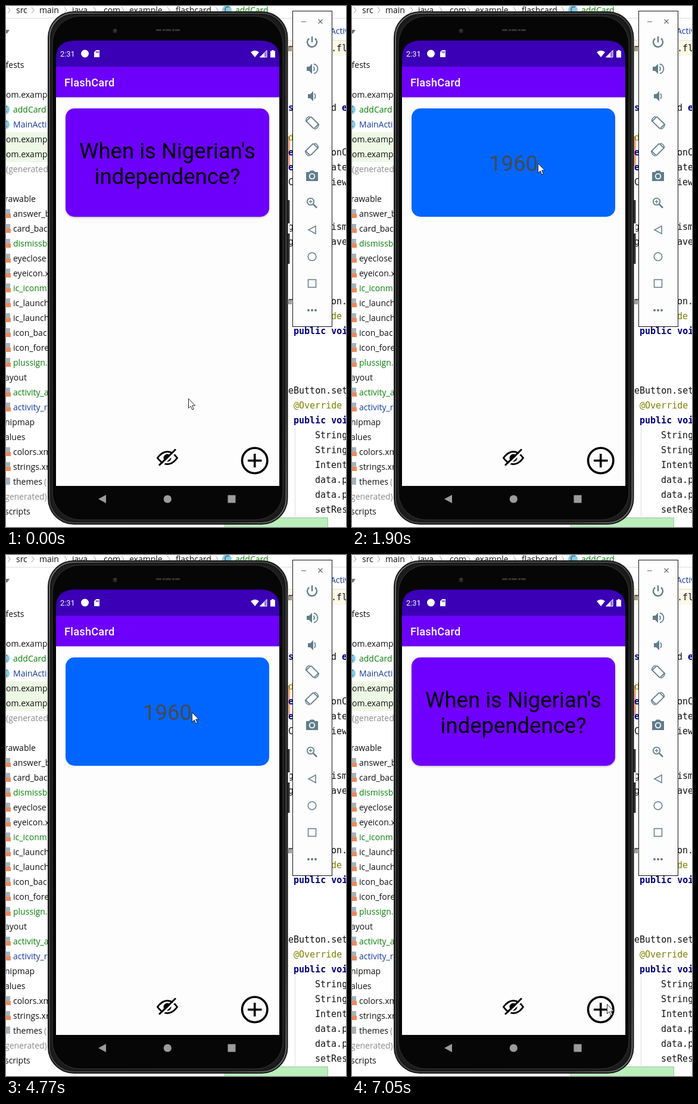
Write an HTML page that moves like this. It is 571 by 875 pixels and loops after 8000 ms.

```html
<!DOCTYPE html>
<html lang="en">
<head>
<meta charset="utf-8">
<title>Flash card</title>
<style>
html, body { margin: 0; width: 100%; height: 100%; overflow: hidden; background: #fff; }
svg { display: block; width: 571px; height: 875px; }
text { white-space: pre; }
.tree { font: 14px "Open Sans", "Noto Sans", sans-serif; }
.code { font: 15px "DejaVu Sans Mono", monospace; }
.app { font-family: Roboto, sans-serif; }
.bold { font-weight: 700; }
.panel { fill: none; stroke: #607d8b; stroke-width: 1.8; }
.panel .solid { fill: #607d8b; stroke: none; }
</style>
</head>
<body>
<svg viewBox="0 0 571 875">
  <defs>
    <linearGradient id="rim" x2="1" y2="1">
      <stop offset="0" stop-color="#777"/><stop offset=".12" stop-color="#4a4a4a"/>
      <stop offset=".88" stop-color="#444"/><stop offset="1" stop-color="#707070"/>
    </linearGradient>
    <filter id="soft" x="-5%" y="-5%" width="110%" height="112%"><feGaussianBlur stdDeviation="1.4"/></filter>
  </defs>

  <rect width="571" height="875" fill="#fff"/>
  <path d="M0 212H75V262H0Z" fill="#edf8e5"/>
  <path d="M470 58H571V84H470Z" fill="#fffae6"/>
  <path d="M0 20.5H571M470 57.5H571" stroke="#ddd"/>
  <path d="M485.500 708V858" stroke="#ddd"/>
  <path d="M0 40H6L2 46H0Z" fill="#777"/>
  <path d="M473 219H477V269H473Z" fill="#f4a384"/>
  <path d="M367.500 859.500H540.500V876H367.500Z" fill="#baeebb" stroke="#9bc59d"/>
  <g id="back"></g>

  <!-- phone -->
  <path d="M472 326H476.500V433H472Z" fill="#333"/>
  <path d="M472 365H476.500V382H472Z" fill="#fff"/>
  <rect x="70" y="9" width="403.500" height="862" rx="44" fill="#151515"/>
  <rect x="73" y="12" width="397.500" height="856" rx="41" fill="none" stroke="url(#rim)" stroke-width="2"/>
  <rect x="75.500" y="14.500" width="392" height="851" rx="40" fill="#1c1c1c"/>
  <rect x="78" y="17" width="387" height="846" rx="46" fill="#060606" stroke="#363636"/>
  <path d="M252 40.500H292" stroke="#343434" stroke-width="3" stroke-dasharray="9 2 4 1"/>
  <circle cx="183" cy="42" r="4" fill="#1c1c1c"/>
  <path d="M180 40L186 38L184 45Z" fill="#383838"/>

  <path d="M84 102V88Q84 58 116 58H427Q459 58 459 88V102Z" fill="#3b00b5"/>
  <path d="M84 102H459V153H84Z" fill="#6d00fa"/>
  <path d="M84 153H459V806H84Z" fill="#fdfdfd"/>
  <path d="M84 153.500H459" stroke="#b9a6d6"/>
  <g class="app" fill="#fff">
    <text x="91" y="85" font-size="12.800">2:31</text>
    <text x="98" y="135" font-size="18.200" font-weight="500" letter-spacing=".25">FlashCard</text>
    <circle cx="132.500" cy="80" r="6.500"/>
    <path d="M151.500 74H157V86H148V77.500Z"/>
    <path d="M411 77.500Q418 72 425 77.500L418 86Z"/>
    <path d="M438 74.500V86H426.500Z" opacity=".45"/><path d="M434 78.500V86H426.500Z"/>
    <path d="M438 74.500V86H426.500Z" fill="none" stroke="#fff"/>
    <path d="M446.500 74H449.500V75.500H452V86.500H444V75.500H446.500Z"/>
  </g>
  <path d="M151.500 76V79M153.500 76V79M155.300 76V79" stroke="#3b00b5"/>

  <rect id="shadow" x="100" y="173.500" width="342" height="182" rx="15" fill="#000" opacity=".25" filter="url(#soft)"/>
  <rect id="card" x="100" y="172" width="342" height="182" rx="15"/>
  <g id="question" class="app" font-size="36.500" text-anchor="middle">
    <text x="271" y="256">When is Nigerian's</text>
    <text x="271" y="299">independence?</text>
  </g>
  <text id="answer" class="app" x="271" y="277.400" font-size="36.500" text-anchor="middle" fill="#46484c">1960</text>

  <g fill="none" stroke="#000">
    <path d="M254.500 759Q262 748.500 271 748.500T287.500 759Q280 769.500 271 769.500T254.500 759Z" stroke-width="2.800"/>
    <circle cx="271" cy="759" r="6.500" fill="#000" stroke="none"/>
    <path d="M259.500 773.500L287.500 746.500" stroke="#fdfdfd" stroke-width="3"/>
    <path d="M257 771.500L285 744.500" stroke-width="3"/>
    <circle cx="417.700" cy="763.500" r="21.200" stroke-width="3.600"/>
    <path d="M406 763.500H429.500M417.700 752V775" stroke-width="3.600"/>
  </g>
  <g fill="#9b9b9b">
    <path d="M155 828L168 821V835Z"/><circle cx="271.300" cy="828" r="6.600"/>
    <path d="M372.500 821.500H385.500V834.500H372.500Z"/>
  </g>

  <!-- side controls -->
  <rect x="481.500" y="8.500" width="66" height="530" fill="#fdfdfd" stroke="#111"/>
  <path d="M496 26.500H504M524.500 22.500L531.500 29.500M531.500 22.500L524.500 29.500" stroke="#666" stroke-width="1.200"/>
  <g class="panel">
    <path d="M514 51V61M509 54.500A8 8 0 1 0 519 54.500" stroke-width="2.400"/>
    <path class="solid" d="M505 102H509L514 97V114L509 109H505Z"/>
    <path d="M516.500 102Q519 105.500 516.500 109M517 97.500C525.500 99 525.500 112 517 113.500"/>
    <path class="solid" d="M507 148H511L516 143V160L511 155H507Z"/>
    <path d="M518 147Q521 151.500 518 156"/>
    <g id="turn">
      <rect x="-5.500" y="-9" width="11" height="18" rx="1.500" transform="translate(514.500 196) rotate(-45)"/>
      <path d="M503.500 194Q503.500 187 510 185.500M525.500 198Q525 205 518.500 207" stroke-width="1.500"/>
    </g>
    <use href="#turn" transform="matrix(-1 0 0 1 1028 45)"/>
    <path class="solid" d="M504 279H509L511 276.500H517L519 279H524V294H504Z"/>
    <circle cx="514" cy="286" r="4.300" stroke="#fdfdfd"/>
    <circle cx="511.500" cy="328.500" r="5.700"/>
    <path d="M516 333L522 339" stroke-width="2.500"/><path d="M508.500 328.500H514.500M511.500 325.500V331.500" stroke-width="1.300"/>
    <path d="M508 376L520 369.500V382.500Z" stroke-width="1.500"/>
    <circle cx="514" cy="421" r="6.800" stroke-width="1.500"/>
    <path d="M507.500 459.500H520.500V472.500H507.500Z" stroke-width="1.500"/>
    <g class="solid"><circle cx="508" cy="511" r="2"/><circle cx="514" cy="511" r="2"/><circle cx="520" cy="511" r="2"/></g>
  </g>

  <path id="cursor" d="M.5 .5V16.500L4.200 13L6.800 19L9.300 18L6.700 12H11.700Z" fill="#fff" stroke="#111" stroke-width=".9"/>
</svg>
<script>
const NS = "http://www.w3.org/2000/svg";
const $ = id => document.getElementById(id);
const back = $("back");
const GREEN = "#0a7d0a", BLUE = "#1437a5", GREY = "#8a8a8a", NAVY = "#000080", OLIVE = "#808000", INK = "#111";

function add(tag, attrs, content = "") {
  const el = document.createElementNS(NS, tag);
  for (const k in attrs) el.setAttribute(k, attrs[k]);
  el.textContent = content;
  back.append(el);
}
const label = (x, y, s, fill = INK, cls = "tree") => add("text", { x, y, fill, class: cls }, s);
const code = (col, y, s, fill = INK) =>
  label(483 + 9 * col, y + 5, s, fill, fill === NAVY ? "code bold" : "code");

function classIcon(x, y) {
  add("circle", { cx: x, cy: y, r: 8, fill: "#86cbe3" });
  add("text", { x, y: y + 4, class: "tree", "font-size": 11, "text-anchor": "middle", fill: "#35505c" }, "C");
}
function fileIcon(y) {
  add("path", { d: `M0 ${y - 8}H7V${y}H0Z`, fill: "#a9b2b9" });
  add("path", { d: `M0 ${y}H8V${y + 7}H0Z`, fill: "#ee8a5c" });
}

// breadcrumb
[[17, "src"], [56, "main"], [111, "java"], [164, "com"], [207, "example"], [285, "flashcard"]]
  .forEach(([x, s]) => label(x, 12, s));
for (const x of [3, 43, 98, 147, 194, 271, 352])
  add("path", { d: `M${x} 2L${x + 4} 7L${x} 12`, fill: "none", stroke: "#999" });
classIcon(371, 7);
label(385, 12, "addCard", GREEN);

// project tree
[[99, -4, "ifests"], [149, 0, "om.exampl"], [224, 0, "om.exampl"], [249, 0, "om.exampl"],
 [274, 0, "(generated", GREY], [324, -2, "rawable"], [624, -2, "ayout"], [699, -2, "nipmap"],
 [724, -2, "alues"], [824, -2, "generated)", GREY], [849, -2, "scripts"],
 [174, 12, "addCard", GREEN], [199, 12, "MainActi", BLUE]]
  .forEach(([y, x, s, c]) => label(x, y + 5, s, c));
classIcon(-2, 174);
classIcon(-2, 199);

const drawables = ["answer_b", "card_bac", "dismissb", "eyeclose", "eyeicon.x", "ic_iconm",
  "ic_launch", "ic_launch", "icon_bac", "icon_fore", "plussign."];
const files = drawables.map((s, i) => [349 + 25 * i, s, [2, 5, 10].includes(i) ? GREEN : INK]);
files.push([649, "activity_a", GREEN], [674, "activity_r", BLUE], [749, "colors.xm"], [774, "strings.xr"]);
for (const [y, s, c] of files) {
  fileIcon(y);
  label(12, y + 5, s, c);
}
add("path", { d: "M0 792H7V804H0Z", fill: "#a9b2b9" });
label(12, 804, "themes");
label(64, 804, "(", GREY);

// editor
label(545, 47, "Activity", BLUE);
[[-1, 71, "m"], [7, 71, ".fl"], [-1, 171, "s", NAVY], [7, 171, "d"], [9, 171, "e", NAVY],
 [-1, 221, "d", OLIVE], [-1, 246, "e", NAVY], [7, 246, "onC"], [-1, 271, "e", NAVY], [7, 271, "ate"],
 [-1, 296, "C"], [7, 296, "iew"], [-1, 371, "g"], [7, 371, "ism"], [-1, 396, "g"], [7, 396, "ave"],
 [-1, 496, "m"], [7, 496, "on."], [7, 521, "de", OLIVE], [0, 546, "public void", NAVY],
 [-1, 646, "eButton.set"], [0, 671, "@Override", OLIVE], [0, 696, "public void", NAVY]]
  .forEach(a => code(...a));
["String", "String", "Intent", "data.p", "data.p", "setRes"].forEach((s, i) => code(4, 721 + 25 * i, s));

// pointer stops: time, x, y
const stops = [
  [0, 306, 659], [400, 368, 573], [520, 384, 547], [800, 372, 515], [960, 355, 406],
  [1080, 353, 401], [1220, 342, 357], [1370, 312, 264], [6130, 427, 609], [6250, 441, 631],
  [6370, 439, 651], [6520, 432, 735], [6650, 431, 750], [6800, 431, 754], [7050, 428, 754]
];
const flips = [1900, 3150, 4770, 5730];

function render(t) {
  const [, x, y] = stops.findLast(s => s[0] <= t);
  $("cursor").setAttribute("transform", `translate(${x} ${y})`);
  const turned = flips.filter(f => f <= t).length;
  const answer = turned % 2 === 1;
  $("card").setAttribute("fill", answer ? "#0066ff" : turned ? "#6f00ff" : "#6c00fa");
  $("shadow").style.display = $("question").style.display = answer ? "none" : "";
  $("answer").style.display = answer ? "" : "none";
}

const start = performance.now();
function tick() {
  render((performance.now() - start) % 8000);
  requestAnimationFrame(tick);
}
tick();
</script>
</body>
</html>
```
